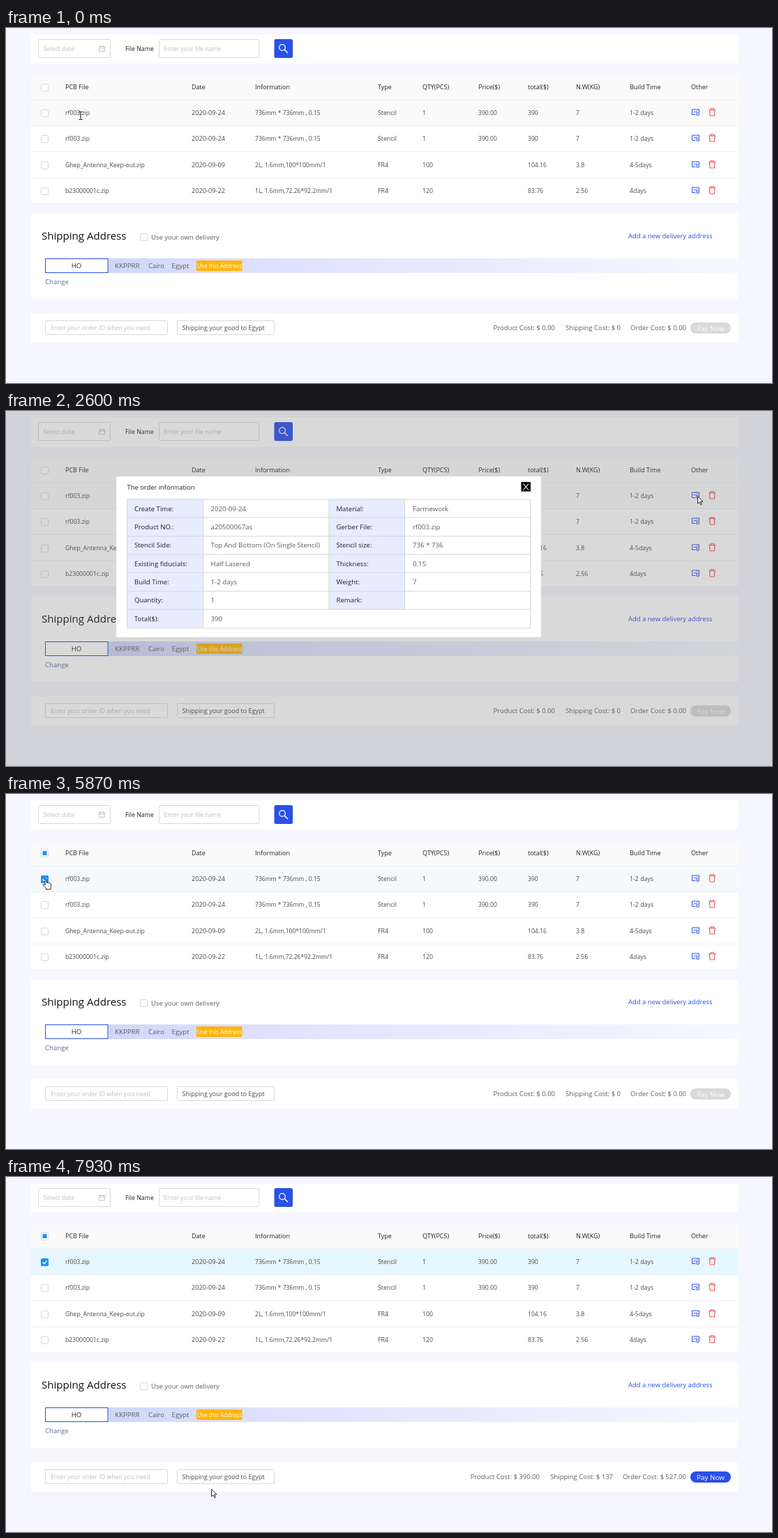
An HTML page that plays this animation: 1098x510 px, repeating every 8000 ms.

```html
<!DOCTYPE html>
<html lang="en">
<head>
<meta charset="utf-8">
<title>Order list</title>
<style>
  html, body { margin: 0; width: 100%; height: 100%; overflow: hidden; background: #f5f6ff; }
  svg { display: block; width: 1098px; height: 510px; font-family: "Open Sans", "Noto Sans", sans-serif; }
  text { white-space: pre; }
</style>
</head>
<body>
<svg id="stage" viewBox="0 0 1098 510"></svg>
<script>
const BLUE = '#2a50e8', CHECK = '#1890ff', LINE = '#d9d9d9';
const INK = '#222', BODY = '#4a4a4a', SOFT = '#5e5e5e', HINT = '#bfbfbf';
const LOOP = 8000, STEP = 1000 / 15;

const rect = (x, y, w, h, fill, extra = '') =>
  `<rect x="${x}" y="${y}" width="${w}" height="${h}" fill="${fill}" ${extra}/>`;
const box = (x, y, w, h, stroke = LINE, extra = 'rx="1"') =>
  rect(x + .5, y + .5, w - 1, h - 1, '#fff', `stroke="${stroke}" ${extra}`);
const text = (x, y, size, str, fill = BODY, extra = '') =>
  `<text x="${x}" y="${y}" font-size="${size}" fill="${fill}" ${extra}>${str}</text>`;
const line = (d, stroke, width = 1, extra = '') =>
  `<path d="${d}" fill="none" stroke="${stroke}" stroke-width="${width}" ${extra}/>`;
const checkbox = (y, id = '') => box(50, y - 5, 11, 11, LINE, `rx="1.5" ${id}`);

const columns = [85, 266, 357, 533, 597, 677, 748, 817, 894];
const sizes = [8.65, 9.2, 8.55, 8.8, 8.75, 8.65, 8.65, 8.65, 8.8];
const headings = ['PCB File', 'Date', 'Information', 'Type', 'QTY(PCS)', 'Price($)', 'total($)', 'N.W(KG)', 'Build Time'];
const stencil = ['rf003.zip', '2020-09-24', '736mm * 736mm , 0.15', 'Stencil', '1', '390.00', '390', '7', '1-2 days'];
const rows = [
  stencil,
  stencil,
  ['Ghep_Antenna_Keep-out.zip', '2020-09-09', '2L, 1.6mm,100*100mm/1', 'FR4', '100', '', '104.16', '3.8', '4-5days'],
  ['b23000001c.zip', '2020-09-22', '1L, 1.6mm,72.26*92.2mm/1', 'FR4', '120', '', '83.76', '2.56', '4days'],
];

function filterBar() {
  return rect(36, 9, 1013.5, 42, '#fff')
    + box(46, 16, 104, 27) + text(53.5, 33, 8.75, 'Select date', HINT)
    + line('M133.5 26.5h8v7h-8zM133.5 29h8M135.5 25v3M139.5 25v3', HINT, .9)
    + text(171, 33, 8.8, 'File Name', INK)
    + box(219, 16, 144, 27) + text(226.5, 33, 8.67, 'Enter your file name', HINT)
    + rect(384.5, 16, 26.5, 27, BLUE, 'rx="2.5"')
    + line('M399 31L404 36', '#fff', 1.4)
    + '<circle cx="396" cy="28" r="4.3" fill="none" stroke="#fff" stroke-width="1.3"/>';
}

function actions(y) {
  return `<g transform="translate(0 ${y})">`
    + line('M988 3.5h-4.5v-7.5h10v4M985.3 .8l2-2 1.3 1.3 2.6-2.6', BLUE)
    + `<circle cx="991.6" cy="2.4" r="2.2" fill="#fff" stroke="${BLUE}"/><circle cx="991.6" cy="2.4" r=".7" fill="${BLUE}"/>`
    + line('M1007.3 -3.3h10M1010 -3.5v-1.7h4.6v1.7M1008.5 -3.3l.6 8.3h6.4l.6 -8.3', '#f0524f', 1.1)
    + '</g>';
}

function table() {
  let out = rect(36, 68, 1013.5, 185, '#fff') + rect(36, 68, 1013.5, 35, '#fafafa')
    + rect(36, 103, 1013.5, 37.5, '#fafafa', 'id="hover"')
    + rect(36, 103, 1013.5, 37.5, '#e6f7ff', 'id="selected"')
    + checkbox(85) + rect(52.5, 82, 6, 6, CHECK, 'class="picked"')
    + rect(36, 102.5, 1013.5, 1, '#f0f0f0');
  headings.forEach((h, i) => out += text(columns[i], 88, 9, h, INK, 'font-weight="500"'));
  out += text(982, 88, 9, 'Other', INK, 'font-weight="500"');
  rows.forEach((row, r) => {
    const y = 122 + r * 37.4;
    out += rect(36, Math.round(y + 18), 1013.5, 1, '#f0f0f0') + checkbox(Math.round(y), r ? '' : 'id="firstBox"');
    row.forEach((cell, i) => out += text(columns[i], Math.round(y) + 3, sizes[i], cell));
    out += actions(Math.round(y) - 1);
  });
  return out + '<g class="picked">' + rect(50, 117, 11, 11, CHECK, 'rx="1.5"')
    + line('M52.6 122.6l2.1 2.2 3.8-4.3', '#fff', 1.4) + '</g>';
}

function shipping() {
  return rect(36, 266.5, 1013.5, 122.5, '#fff')
    + text(51, 304, 15.05, 'Shipping Address', '#111')
    + box(192, 295, 11, 11, LINE, 'rx="1.5"') + text(208, 304, 9.5, 'Use your own delivery', SOFT)
    + text(892, 302, 9.48, 'Add a new delivery address', BLUE)
    + rect(146, 331, 903.5, 21, 'url(#band)') + box(56, 331, 90.5, 21, BLUE, '')
    + text(101, 345, 9.5, 'HO', INK, 'text-anchor="middle"')
    + text(156, 345, 9.7, 'KKPPRR', SOFT) + text(204, 345, 9.4, 'Cairo', SOFT) + text(237.5, 345, 9.7, 'Egypt', SOFT)
    + rect(273, 334, 65.5, 15, '#ffb508') + text(274, 345, 8.25, 'Use this Address', '#fff', 'font-weight="500"')
    + text(56, 368, 9.6, 'Change', '#5f6b94');
}

function payment() {
  const costs = (cls, list) => `<g class="${cls}" text-anchor="end">`
    + list.map(([x, label]) => text(x, 433.5, 9.5, label, SOFT)).join('') + '</g>';
  return rect(36, 410, 1013.5, 42, '#fff')
    + box(56, 420, 176, 21) + text(64, 434, 8.71, 'Enter your order ID when you need', HINT)
    + box(245, 420, 140, 21) + text(252.5, 434, 9, 'Shipping your good to Egypt', BODY)
    + costs('unpriced', [[787, 'Product Cost: $ 0.00'], [881, 'Shipping Cost: $ 0'], [975, 'Order Cost: $ 0.00']])
    + costs('priced', [[765, 'Product Cost: $ 390.00'], [870, 'Shipping Cost: $ 137'], [975, 'Order Cost: $ 527.00']])
    + rect(981, 423, 58, 16, LINE, 'rx="8" id="pay"')
    + text(1010, 434.5, 9.8, 'Pay Now', '#fff', 'text-anchor="middle"');
}

function dialog() {
  const left = [['Create Time:', '2020-09-24'], ['Product NO.:', 'a20500067as'],
    ['Stencil Side:', 'Top And Bottom (On Single Stencil)'], ['Existing fiducials:', 'Half Lasered'],
    ['Build Time:', '1-2 days'], ['Quantity:', '1'], ['Total($):', '390']];
  const right = [['Material:', 'Farmework'], ['Gerber File:', 'rf003.zip'], ['Stencil size:', '736 * 736'],
    ['Thickness:', '0.15'], ['Weight:', '7'], ['Remark:', '']];
  const rowH = 26.36, edge = '#d5d6dc';
  let out = rect(0, 0, 1098, 510, 'rgba(110,110,110,.26)')
    + rect(158, 94, 609, 231, '#fff', 'rx="2"')
    + text(173.5, 113, 9.4, 'The order information', INK)
    + rect(738.5, 102, 13.5, 13.5, '#000') + line('M741.5 104.5l7.5 9M749 104.5l-7.5 9', '#fff', 1.1)
    + rect(173, 127, 110, 184.5, '#e8ecff') + rect(463, 127, 108.5, rowH * 6, '#e8ecff');
  for (let i = 0; i < 8; i++) out += rect(173, Math.round(127 + i * rowH) - .5, 579, 1, edge);
  [[173, 7], [282, 7], [462.5, 6], [571, 6], [751, 7]].forEach(([x, n]) => out += rect(x, 127, 1, rowH * n, edge));
  const pairs = (list, x1, x2) => list.forEach(([label, value], i) => {
    const y = Math.round(143.5 + i * rowH);
    out += text(x1, y, 9.55, label, INK) + text(x2, y, 9.7, value, SOFT);
  });
  pairs(left, 184, 293.5);
  pairs(right, 473.5, 583);
  return `<g id="dialog">${out}</g>`;
}

const cursors = '<g id="cursor">'
  + '<path id="arrow" d="M.5 .5V11L2.9 8.8 4.7 12.6 6.3 11.9 4.6 8.2H8Z" fill="#fff" stroke="#111" stroke-width=".9"/>'
  + line('M-2.5 -5.5h2l.5 .5.5-.5h2M0 -5V5M-2.5 5.5h2l.5-.5.5 .5h2', '#111', 1, 'id="beam"')
  + '<path id="hand" d="M0 0q1.2-1 2 .3V5l5.3 1.3q1.6.5 1.4 2L8 12.5V15H1.5V13L-3 8.6q0-1.5 1.6-1L0 9Z" fill="#fff" stroke="#111" stroke-width=".9"/>'
  + '</g>';

const stage = document.getElementById('stage');
stage.innerHTML = `<defs><linearGradient id="band"><stop stop-color="#cfd7f8"/>
  <stop offset=".25" stop-color="#dee2fe"/><stop offset="1" stop-color="#f6f8ff"/></linearGradient></defs>`
  + rect(0, 0, 1098, 510, '#f5f6ff') + filterBar() + table() + shipping() + payment() + dialog() + cursors;

// Pointer moves: start, end, target x, y and optional bend point.
const start = [107, 126];
const moves = [
  [333, 1200, 56, 122, 80, 128],
  [1267, 2000, 1008, 124, 500, 59],
  [2000, 2133, 992, 123],
  [2200, 2267, 991, 122],
  [3133, 3800, 726, 124, 850, 146],
  [3800, 4000, 744, 111],
  [4000, 4200, 744, 109],
  [4533, 5333, 59, 126, 400, 125],
  [5333, 5533, 56, 122],
  [5930, 6333, 269, 280, 120, 230],
  [6333, 6467, 270, 290],
  [6467, 7267, 1017, 432, 640, 330],
  [7267, 7930, 294, 448, 650, 446],
];
const clamp = v => Math.max(0, Math.min(1, v));
const ramp = (t, from, length) => clamp((t - from) / length);

function pointer(t) {
  let [x, y] = start;
  for (const [t0, t1, tx, ty, bx = (x + tx) / 2, by = (y + ty) / 2] of moves) {
    if (t < t0) break;
    const u = ramp(t, t0, t1 - t0), k = u * u * (3 - 2 * u), j = 1 - k;
    x = j * j * x + 2 * j * k * bx + k * k * tx;
    y = j * j * y + 2 * j * k * by + k * k * ty;
  }
  return [x, y];
}

const $ = id => document.getElementById(id);
const show = (el, on) => el.setAttribute('visibility', on ? 'visible' : 'hidden');
const showAll = (cls, on) => stage.querySelectorAll('.' + cls).forEach(el => show(el, on));

function draw(t) {
  const [x, y] = pointer(t);
  const overBox = x < 62 && y > 115 && y < 128;
  const overPay = x > 981 && y > 423 && y < 439;
  const overName = x > 85 && x < 120 && y > 114 && y < 130;
  const priced = t > 6050;
  $('cursor').setAttribute('transform', `translate(${Math.round(x)} ${Math.round(y)})`);
  show($('hand'), overBox || overPay);
  show($('beam'), overName);
  show($('arrow'), !(overBox || overPay || overName));
  show($('dialog'), t > 2590 && t < 4525);
  $('hover').setAttribute('opacity', t < 4000 ? 1 - ramp(t, 2730, 140) : ramp(t, 4533, 300));
  $('selected').setAttribute('opacity', ramp(t, 5800, 300));
  $('firstBox').setAttribute('stroke', overBox ? CHECK : LINE);
  showAll('picked', t > 5860);
  showAll('priced', priced);
  showAll('unpriced', !priced);
  $('pay').setAttribute('fill', priced ? BLUE : LINE);
}

const origin = performance.now();
function tick() {
  const t = (performance.now() - origin) % LOOP;
  draw(Math.floor((t + 5) / STEP) * STEP);
  requestAnimationFrame(tick);
}
tick();
</script>
</body>
</html>
```
